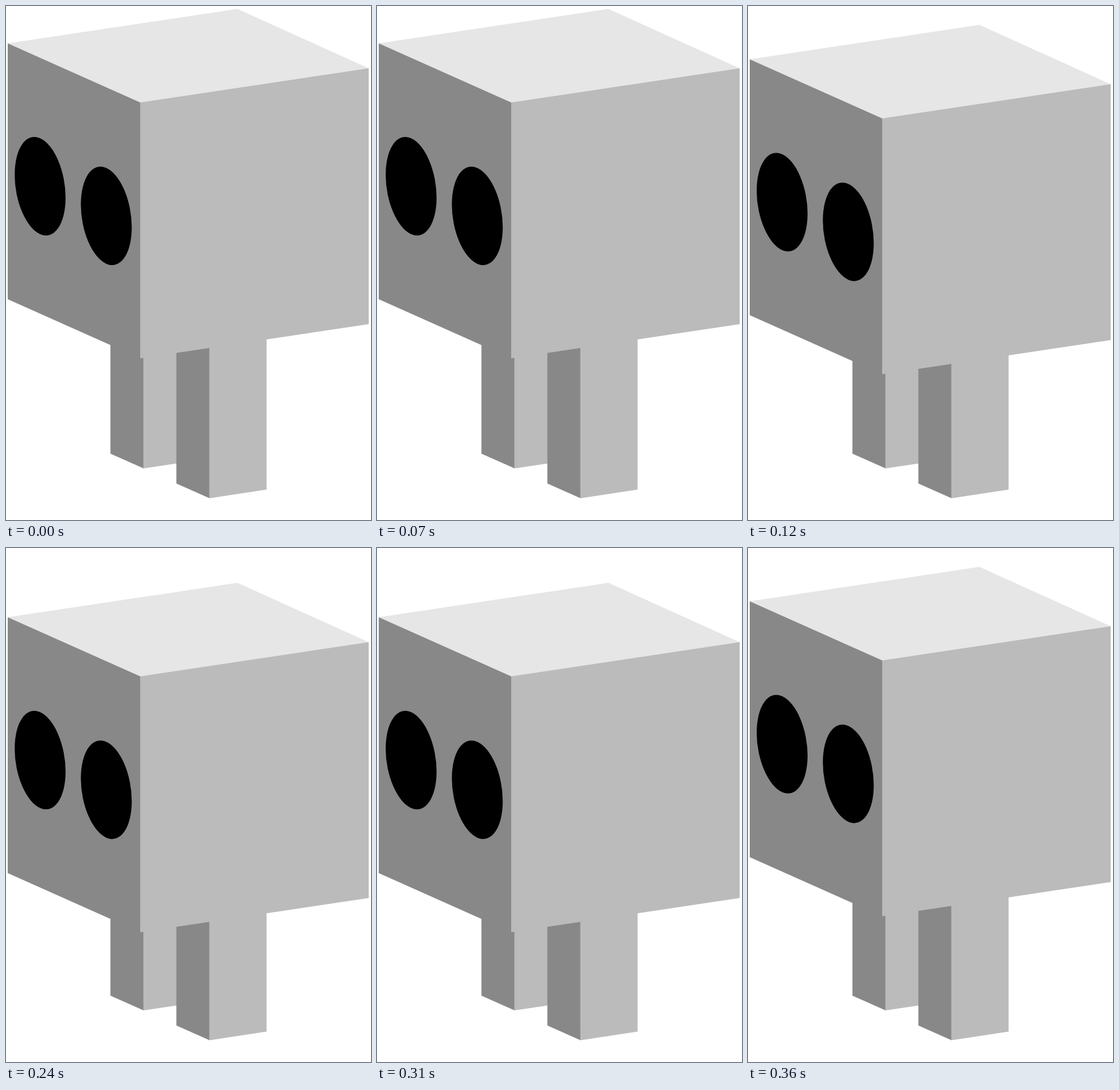
An HTML page that plays this animation: 631x887 px, repeating every 480 ms.

```html
<!DOCTYPE html>
<html lang="en">
<head>
<meta charset="utf-8">
<title>Bobbing cube head</title>
<style>
  html, body { margin: 0; width: 100%; height: 100%; overflow: hidden; background: #fff; }
  svg { display: block; width: 100%; height: 100%; }
  .top { fill: #e6e6e6; }
  .front { fill: #888; }
  .side { fill: #bbb; }
</style>
</head>
<body>
<svg viewBox="0 0 631 887">
  <g id="legs">
    <path class="front" d="M180.5 560H238V798L180.5 772.5Z"/>
    <path class="side" d="M237.5 560H295V789.5L237.5 798Z"/>
    <path class="front" d="M294.5 560H352V849.5L294.5 824Z"/>
    <path class="side" d="M351.5 560H450.5V834.5L351.5 849.5Z"/>
  </g>
  <g id="head">
    <path class="top" d="M3 64.5L400 5L627 107.5V109L232 168L3 66Z"/>
    <path class="front" d="M3 64.5L232 166.5V608L3 506Z"/>
    <path class="side" d="M232 166.5L627 107.5V549L232 608Z"/>
    <circle r="1" transform="matrix(44 19.6 0 82.7 59 311)"/>
    <circle r="1" transform="matrix(44 19.6 0 82.7 173.4 362.2)"/>
  </g>
</svg>
<script>
  const STEP_MS = 120;
  const DROP = 27.5;
  const bob = [0, 1, 2, 1];
  const head = document.getElementById('head');
  const start = performance.now();

  function draw(ms) {
    const step = Math.floor(ms / STEP_MS) % bob.length;
    head.setAttribute('transform', `translate(0 ${bob[step] * DROP})`);
  }

  function tick() {
    draw(performance.now() - start);
    requestAnimationFrame(tick);
  }
  tick();
</script>
</body>
</html>
```
